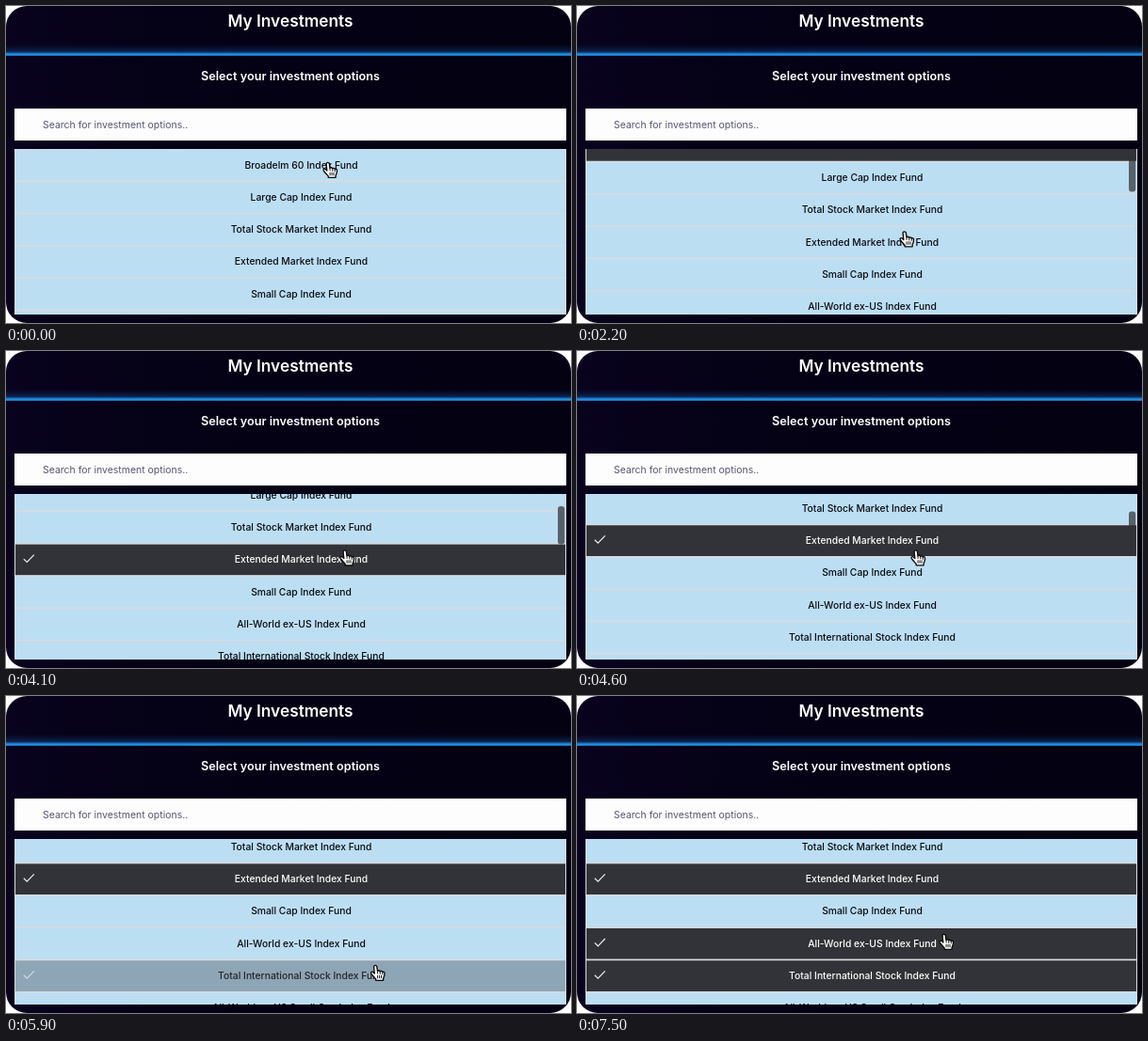
An HTML page that plays this animation: 600 px wide and 337 px high, repeating every 7.7 s.

```html
<!DOCTYPE html>
<html lang="en">
<head>
<meta charset="utf-8">
<title>My Investments</title>
<style>
  html, body { margin: 0; width: 100%; height: 100%; overflow: hidden; background: #fff; }
  svg { display: block; width: 100%; height: 100%; }
  text { font-family: Inter, Roboto, sans-serif; }
  .mid { text-anchor: middle; }
  .row text { font-size: 10.35px; font-weight: 500; }
  .row rect { stroke: #d6dcdf; stroke-width: 1.5; }
  .row path { fill: none; stroke: #eceff0; stroke-width: 1.2; }
</style>
</head>
<body>
<svg viewBox="0 0 600 337" xmlns="http://www.w3.org/2000/svg">
  <defs>
    <linearGradient id="page">
      <stop offset="0" stop-color="#09031e"/>
      <stop offset=".25" stop-color="#050116"/>
      <stop offset="1" stop-color="#040112"/>
    </linearGradient>
    <linearGradient id="glow" x2="0" y2="1">
      <stop offset="0" stop-color="#0a2a58" stop-opacity="0"/>
      <stop offset=".6" stop-color="#0c3668" stop-opacity=".6"/>
      <stop offset=".8" stop-color="#1c7ccc"/>
      <stop offset=".9" stop-color="#2294ec"/>
      <stop offset="1" stop-color="#1766aa"/>
    </linearGradient>
    <clipPath id="stage"><rect width="600" height="337" rx="22"/></clipPath>
    <clipPath id="box"><rect x="9" y="152" width="586" height="176"/></clipPath>
  </defs>
  <g clip-path="url(#stage)">
    <rect width="600" height="337" fill="url(#page)"/>
    <rect y="41" width="600" height="12" fill="url(#glow)"/>
    <text class="mid" x="302" y="22.2" font-size="17.3" font-weight="600" fill="#fff">My Investments</text>
    <text class="mid" x="302" y="78.6" font-size="12.7" font-weight="600" fill="#fff">Select your investment options</text>
    <rect x="9" y="109" width="586" height="34" fill="#fdfdfe"/>
    <text x="39" y="129.5" font-size="10.47" fill="#56566e">Search for investment options..</text>
    <g clip-path="url(#box)">
      <rect x="9" y="152" width="586" height="176" fill="#bcdef3"/>
      <g id="list"></g>
      <rect id="thumb" x="586" width="7.2" height="40.5" rx="3.2" fill="#303338"/>
    </g>
    <g id="hand" stroke="#0a0a0a" stroke-width="1.3" stroke-linejoin="round" stroke-linecap="round">
      <path fill="#fff" d="M-1.8 1.4C-1.9-.5 1-.6 1.3 1.1L1.9 5.6C2.4 4.7 4.2 4.9 4.5 6.2C5.1 5.3 6.7 5.6 7 6.9C7.6 6.2 9.2 6.6 9.2 8.2C9.2 11 8.2 12 7.8 13.2V15.2H.2V13.8C-1.2 12.2-3.4 9.8-4.5 8.2C-5.4 6.6-3.4 5.8-2.3 7L-1.1 8.2Z"/>
      <path fill="none" stroke-width=".9" d="M2 5.8V8.2M4.6 6.4V8.6M7 7.2V9M2 10.3V12.8M3.9 10.3V12.8M5.8 10.3V12.8"/>
    </g>
  </g>
</svg>
<script>
const LOOP = 7700, STEP = 100, PITCH = 34.3, TOP = 152;
const LIGHT = [188, 222, 243], DARK = [49, 51, 56], BLACK = [8, 10, 14], WHITE = [255, 255, 255];

// name and the time it is picked
const funds = [
  ["Broadelm 60", 500], ["Large Cap"], ["Total Stock Market"], ["Extended Market", 2600],
  ["Small Cap"], ["All-World ex-US", 6500], ["Total International Stock", 5800],
  ["All-World ex-US Small Cap"]
];
// start, end, x, y
const moves = [
  [1600, 2100, 348, 240], [2900, 3400, 360, 212], [5200, 5700, 392.5, 286.5], [5950, 6300, 390, 253.5]
];
// start, end, distance, ease power
const scrolls = [[1100, 2000, 20.7, 2.5], [3700, 5300, 56.6, 2.54]];

const $ = id => document.getElementById(id);
const clamp = v => Math.min(1, Math.max(0, v));
const span = (t, a, b) => clamp((t - a) / (b - a));
const easeOut = (u, p) => 1 - Math.pow(1 - u, p);
const smooth = u => u * u * (3 - 2 * u);
const mix = (a, b, k) => `rgb(${a.map((v, i) => Math.round(v + (b[i] - v) * k))})`;

function make(tag, attrs, parent) {
  const el = document.createElementNS("http://www.w3.org/2000/svg", tag);
  for (const key in attrs) el.setAttribute(key, attrs[key]);
  return parent.appendChild(el);
}

const rows = funds.map(([name, picked = Infinity], i) => {
  const g = make("g", { class: "row", transform: `translate(0 ${i * PITCH})` }, $("list"));
  const back = make("rect", { x: 9.3, y: 0, width: 585.4, height: PITCH }, g);
  const label = make("text", { class: "mid", x: 313.5, y: 20.6 }, g);
  label.textContent = name + " Index Fund";
  const check = make("path", { d: "M18.8 16.2L22.3 19.6L29.8 11.8" }, g);
  return { picked, back, label, check };
});

function draw(t) {
  let scroll = 0, bar = 0;
  for (const [a, b, dist, power] of scrolls) {
    scroll += dist * easeOut(span(t, a, b), power);
    if (t >= a) bar = 1 - span(t, b + 300, b + 500);
  }
  $("list").setAttribute("transform", `translate(0 ${TOP - scroll})`);
  $("thumb").setAttribute("y", 151.4 + 0.27 * scroll);
  $("thumb").setAttribute("opacity", 0.72 * bar);

  for (const { picked, back, label, check } of rows) {
    const k = t < picked ? 0 : easeOut(span(t, picked, picked + 400), 1.4);
    back.setAttribute("fill", mix(LIGHT, DARK, k));
    label.setAttribute("fill", mix(BLACK, WHITE, k * k));
    check.setAttribute("opacity", clamp(k * 2.2));
  }

  let x = 342, y = 166.5;
  for (const [a, b, toX, toY] of moves) {
    const k = smooth(span(t, a, b));
    x += (toX - x) * k;
    y += (toY - y) * k;
  }
  $("hand").setAttribute("transform", `translate(${x} ${y}) scale(1.04)`);
}

const start = performance.now();
function tick() {
  const t = (performance.now() - start) % LOOP;
  draw(Math.floor(t / STEP) * STEP);
  requestAnimationFrame(tick);
}
tick();
</script>
</body>
</html>
```
